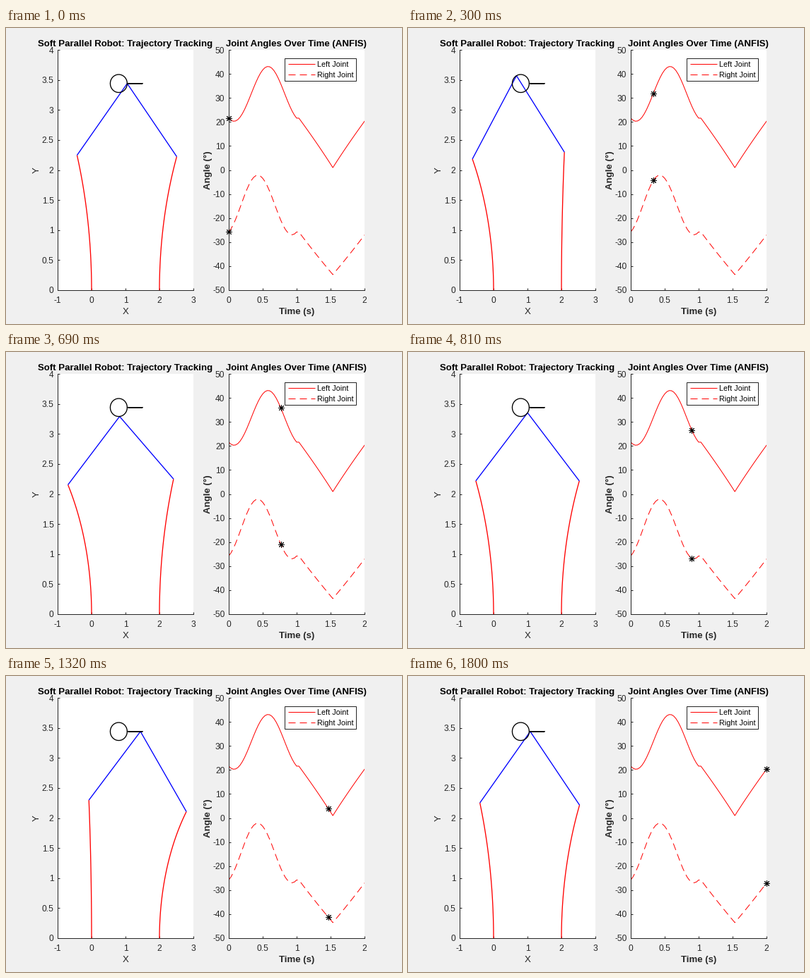
Recreate the animation shown at these times as a matplotlib script. Size 560x420 px, loop 1830 ms.

```python
import numpy as np
import matplotlib.pyplot as plt
from matplotlib.animation import FuncAnimation
from matplotlib.patches import Rectangle

W, H = 560, 420
PX = 0.72  # points per pixel at 100 dpi
INK = "#262626"
FRAMES = 61
DASH = (0, (10, 6))

plt.rcParams.update({
    "font.family": "Liberation Sans",
    "axes.unicode_minus": False,
    "path.simplify": False,
})

# Geometry of the robot
ARM, LINK, SPAN = 2.3, 1.9, 2.0


def bend(angle, s=1.0):
    """Point at fraction s of a constant-curvature arm, bending outward."""
    half = angle * s / 2
    out = ARM * s * np.sin(half) * np.sinc(half / np.pi)
    up = ARM * s * np.sinc(2 * half / np.pi)
    return out, up


def solve(x, y):
    """Bend angle whose arm tip lies one link away from (x, y)."""
    lo, hi = np.full_like(x, -0.3), np.full_like(x, 1.2)
    for _ in range(40):
        mid = (lo + hi) / 2
        out, up = bend(mid)
        far = np.hypot(x + out, y - up) > LINK
        hi, lo = np.where(far, mid, hi), np.where(far, lo, mid)
    return (lo + hi) / 2


# Path: one turn of an ellipse, then out along a line and back
turn = np.linspace(0, 2 * np.pi, 31)
reach = np.linspace(1.05, 1.5, 16)
path_x = np.concatenate([0.8 + 0.25 * np.cos(turn), reach, reach[-2:0:-1]])
path_y = np.concatenate([3.44 + 0.15 * np.sin(turn), np.full(30, 3.44)])
time = np.linspace(0, 2, FRAMES)
left = solve(path_x, path_y)
right = solve(SPAN - path_x, path_y)
left_deg, right_deg = np.degrees(left), -np.degrees(right)

fig = plt.figure(figsize=(W / 100, H / 100), dpi=100, facecolor="#f0f0f0")


def panel(x, xlim, ylim, xticks, yticks):
    ax = fig.add_axes([x / W, 48 / H, 192 / W, 341 / H])
    ax.set(xlim=xlim, ylim=ylim, xticks=xticks, yticks=yticks)
    ax.set_xticklabels([f"{v:g}" for v in xticks])
    ax.set_yticklabels([f"{v:g}" for v in yticks])
    ax.spines[["top", "right"]].set_visible(False)
    ax.spines[["left", "bottom"]].set(linewidth=PX, color=INK)
    ax.tick_params(direction="in", length=3 * PX, width=PX, color=INK,
                   labelcolor=INK, labelsize=12 * PX)
    ax.tick_params(axis="x", pad=9.5 * PX)
    ax.tick_params(axis="y", pad=5.5 * PX)
    return ax


robot = panel(73, (-1, 3), (0, 4), np.arange(-1, 4), np.arange(0, 4.5, 0.5))
chart = panel(315, (0, 2), (-50, 50), np.arange(0, 2.5, 0.5),
              np.arange(-50, 51, 10))

# Overlay in pixel coordinates for titles, labels and legend
stage = fig.add_axes([0, 0, 1, 1])
stage.set(xlim=(0, W), ylim=(H, 0))
stage.axis("off")


def label(x, y, text, size=13.2, color=INK, **kw):
    kw = {"ha": "center", "va": "baseline", **kw}
    stage.text(x, y, text, fontsize=size * PX, color=color, **kw)


label(168.7, 26, "Soft Parallel Robot: Trajectory Tracking", color="k",
      weight="bold")
label(410.3, 26, "Joint Angles Over Time (ANFIS)", color="k", weight="bold")
label(169.5, 406, "X")
label(411, 406, "Time (s)", weight="bold")
label(44, 201.5, "Y", rotation=90, va="center")
label(286, 201.5, "Angle (°)", rotation=90, va="center", weight="bold")

stage.add_patch(Rectangle((394, 43), 101, 32, fc="w", ec=INK, lw=PX))
for y, text, style in ((51, "Left Joint", "-"), (66, "Right Joint", DASH)):
    stage.plot([398.5, 437], [y, y], color="r", lw=PX, ls=style,
               dash_capstyle="butt", solid_capstyle="butt")
    label(440.5, y + 4, text, size=10.8, color="k", ha="left")

# Robot: arms, links and path
thick = dict(lw=1.33 * PX, clip_on=False, solid_capstyle="butt")
arm_l, = robot.plot([], [], "r", **thick)
arm_r, = robot.plot([], [], "r", **thick)
links, = robot.plot([], [], "b", solid_joinstyle="miter", **thick)
robot.plot(path_x, path_y, "k", **thick)

# Joint angles
chart.plot(time, left_deg, "r", lw=PX)
chart.plot(time, right_deg, "r", lw=PX, ls=DASH, dash_capstyle="butt")
stars, = chart.plot([], [], "k", ls="none", marker=(8, 2, 0),
                    ms=8.5 * PX, mew=PX, clip_on=False, zorder=5)

S = np.linspace(0, 1, 40)


def draw(i):
    lx, ly = bend(left[i], S)
    rx, ry = bend(right[i], S)
    arm_l.set_data(-lx, ly)
    arm_r.set_data(SPAN + rx, ry)
    links.set_data([-lx[-1], path_x[i], SPAN + rx[-1]],
                   [ly[-1], path_y[i], ry[-1]])
    stars.set_data([time[i]] * 2, [left_deg[i], right_deg[i]])
    return arm_l, arm_r, links, stars


anim = FuncAnimation(fig, draw, frames=FRAMES, interval=30, repeat=True,
                     repeat_delay=0, blit=False)
plt.show()
```
